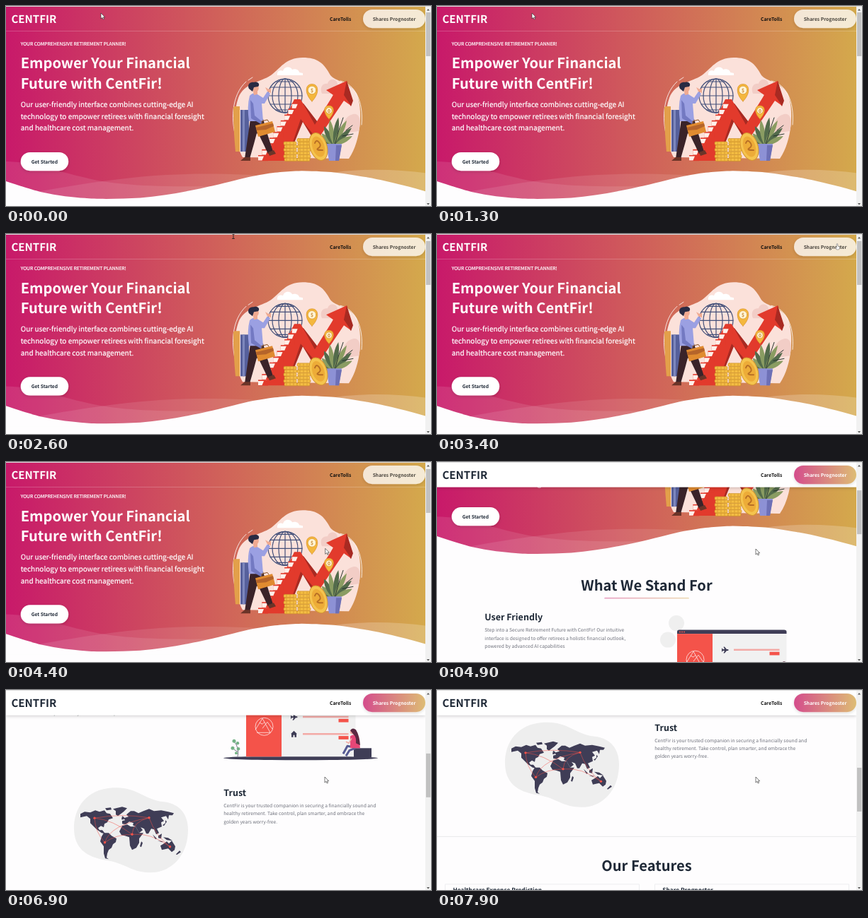
Animation, 600 px wide and 283 px high, one loop 8 s. Source, as an HTML page:

```html
<!DOCTYPE html>
<html lang="en">
<head>
<meta charset="utf-8">
<title>Retirement planner</title>
<style>
html, body { margin: 0; width: 100%; height: 100%; overflow: hidden; background: #fff; }
svg { display: block; width: 600px; height: 283px; }
text { font-family: "Noto Sans CJK SC", "Noto Sans CJK JP", "Noto Sans CJK KR", "Noto Sans", sans-serif; font-size: 6.71px; text-rendering: geometricPrecision; }
.b { font-weight: 700; }
.lead { font-size: 10.07px; }
.title { font-size: 20.13px; font-weight: 700; }
.brand { font-size: 15.04px; font-weight: 700; }
.sub { font-size: 12.53px; font-weight: 700; }
.card { font-size: 8.36px; font-weight: 700; }
.mid { text-anchor: middle; }
.ink { fill: #1f2937; }
.grey { fill: #6f727c; }
.navy { fill: #3f3d56; }
.line { fill: none; }
.firm { stroke: #fff; stroke-width: .2; }
</style>
</head>
<body>
<svg viewBox="0 0 600 283">
<defs>
  <linearGradient id="heroFill" gradientUnits="userSpaceOnUse" x1="0" x2="592">
    <stop stop-color="#c8196a"/><stop offset=".5" stop-color="#d0605a"/><stop offset="1" stop-color="#d4a94c"/>
  </linearGradient>
  <linearGradient id="pillFill"><stop stop-color="#c8196a"/><stop offset="1" stop-color="#d4a94c"/></linearGradient>
  <filter id="soft" x="-20%" y="-40%" width="140%" height="200%">
    <feDropShadow dx="0" dy="1.5" stdDeviation="2" flood-opacity=".18"/>
  </filter>
</defs>
<rect width="600" height="283" fill="#fefdfe"/>

<g id="page">
  <rect y="-2" width="592" height="275.4" fill="url(#heroFill)"/>
  <g fill="#fff">
    <text class="firm" x="20.7" y="55.7">YOUR COMPREHENSIVE RETIREMENT PLANNER!</text>
    <text class="title" x="20.7" y="88.4">Empower Your Financial</text>
    <text class="title" x="20.7" y="116.5">Future with CentFir!</text>
    <g class="firm">
      <text class="lead" x="20.7" y="142.6">Our user-friendly interface combines cutting-edge AI</text>
      <text class="lead" x="20.7" y="159.5">technology to empower retirees with financial foresight</text>
      <text class="lead" x="20.7" y="176.4">and healthcare cost management.</text>
    </g>
    <rect x="20.7" y="207" width="67.5" height="26.2" rx="13.1" filter="url(#soft)"/>
  </g>

  <!-- climbing the arrow -->
  <g stroke-linejoin="round" stroke-linecap="round">
    <path fill="#fbe1da" d="M334 214C323 194 319 156 328 130C336 109 359 108 374 98C387 89 394 73 419 73C440 73 449 81 458 98C465 107 485 107 495 124C504 145 502 190 484 216Z"/>
    <path fill="#f2cdc6" d="M446 124C442 114 448 109 454 110C456 101 468 103 468 111C476 112 475 122 472 124ZM478 180C474 168 478 156 490 153C499 151 502 162 498 177Z"/>
    <path class="line" stroke="#fff" stroke-width=".8" d="M327 194C316 164 318 126 339 107M342 105L348 101M472 106C492 110 505 134 502 168"/>
    <path fill="#fff" d="M383 95C384 90 389 91 391 92C393 85 402 85 404 90C409 88 414 91 414 94L419 95V98H383Z"/>
    <path fill="#e3a04a" d="M321 144Q321 142 323 142H330V206H324Q321 176 321 144Z"/>
    <path fill="#56609c" d="M331 147H343V206H331Z"/><path fill="#7d87bd" d="M334 147H337V206H334Z"/>
    <g class="line" stroke="#43507a" stroke-width="1.2">
      <circle cx="394" cy="127" r="24"/>
      <ellipse cx="394" cy="127" rx="9" ry="24"/><ellipse cx="394" cy="127" rx="18" ry="24"/>
      <path d="M394 103V151M370 127H418M373 115H415M373 139H415M381 107H407M381 147H407"/>
    </g>
    <path fill="#a82a22" d="M413 136L420 138L446 172L436 192L419 164L402 206ZM481 106L490 134L487 142L472 121ZM462 126L468 130L446 176L437 178Z"/>
    <path fill="#e23a2c" d="M365 219L407 132H416L436 168L462 126L452 119L481 106L487 141L477 134L440 189L416 160L396 219Z"/>
    <path fill="#a82a22" d="M481 106L488 134L487 141L477 126Z"/>
    <g id="stairs"></g>
    <g fill="#f4b73d" stroke="#d38b27" stroke-width=".6">
      <path d="M432 135C421 124 422 110.500 432 110.500S443 124 432 135ZM456 160C447 151 448 141 456 141S465 151 456 160Z"/>
      <circle cx="432" cy="119" r="5.8" fill="#fff4d4"/><circle cx="456" cy="148" r="4.4" fill="#fff4d4"/>
    </g>
    <text class="mid b" x="432" y="121.7" fill="#c5822b">$</text><text class="mid b" x="456" y="150.6" fill="#c5822b">0</text>
    <g id="coins" fill="#f4bd43" stroke="#c88a26" stroke-width=".6"></g>
    <g id="leaves"></g>
    <path class="line" stroke="#26332f" stroke-width="1" d="M464 197Q469 176 476 158M480 176L489 169M475 184L490 181"/>
    <path fill="#8d91d5" d="M452 195H474L470 219H456Z"/><path fill="#6d70b6" d="M466 197H474L470 219H465Z"/>
    <ellipse cx="441" cy="199" rx="12" ry="20" transform="rotate(-18 441 199)" fill="#f5c44e" stroke="#d49630"/>
    <ellipse cx="441" cy="199" rx="8.5" ry="15" transform="rotate(-18 441 199)" fill="#edac38"/>
    <path class="line" stroke="#b86f25" stroke-width="2" d="M436 194Q438 188 442 193T441 201T447 204"/>
    <path fill="#3a2329" d="M345 160H363L369 181L377 206L370 209L358 184L354 180L350 195L344 216H337L341 188Z"/>
    <path fill="#6b3428" d="M337 214H345V219H331ZM370 207L378 204L381 209L372 212Z"/>
    <path fill="#9ba0e2" d="M344 127Q349 121 355 125L363 130L369 121L373 124L365 138H361L363 163H343Q340 142 344 127Z"/>
    <path fill="#7379c2" d="M345 133L349 138L351 155L362 164L360 167L346 159Z"/>
    <path fill="#f0aa91" d="M348 117H355V125L350 126ZM369 121L366 115L371 118L374 116L374 123Z"/>
    <ellipse cx="353" cy="116" rx="3.8" ry="5.2" fill="#f0aa91"/>
    <path fill="#292b43" d="M343 117C340 111 345 107 350 108C356 106 359 111 356 114L350 115L348 121Z"/>
    <path class="line" stroke="#865022" d="M361 167V163L369 161L371 164"/>
    <path fill="#e08b30" d="M352 169L376 163L380 178L356 185Z"/><path fill="#b5642a" d="M353 172L377 166L378 170L367 175L354 176Z"/>
  </g>
  <text class="mid b ink" x="54.4" y="222.6">Get Started</text>

  <g fill="#fff" transform="translate(0 201.8) scale(.4146)">
    <g transform="translate(-2 44)">
      <path opacity=".1" d="M0 0C91 1 148 27 292 60C388 82 544 89 759 83C469 156 216 154 0 75"/>
      <path opacity=".1" d="M100 105C277 72 426 53 546 46C666 39 811 42 979 55C931 56 810 75 617 111C423 148 251 145 100 105"/>
      <path opacity=".2" d="M1046 52C1131 29 1279 18 1439 40V120C1271 78 1140 55 1046 52"/>
    </g>
    <path fill="#fefdfe" transform="translate(-4 76)" d="M0 34C57 53 98 66 124 72C181 85 234 90 272 93C311 97 397 96 461 92C560 84 660 62 728 46C780 34 819 22 856 16C922 4 956 2 1011 0C1061 1 1097 3 1121 5C1162 9 1209 18 1235 22C1286 31 1354 47 1441 72V106H0Z"/>
  </g>

  <text class="title mid ink" x="296" y="324.5">What We Stand For</text>
  <rect x="236.3" y="334.6" width="119.5" height="1.9" rx=".9" fill="url(#pillFill)" opacity=".4"/>
  <text class="sub ink" x="67.3" y="367">User Friendly</text>
  <g class="grey">
    <text x="67.3" y="383.3">Step into a Secure Retirement Future with CentFir! Our intuitive</text>
    <text x="67.3" y="394.5">interface is designed to offer retirees a holistic financial outlook,</text>
    <text x="67.3" y="405.7">powered by advanced AI capabilities</text>
  </g>

  <!-- browser window -->
  <g transform="translate(0 245)">
    <g fill="#efefef"><circle cx="338" cy="126" r="11"/><circle cx="326" cy="149.5" r="11"/></g>
    <ellipse class="navy" cx="416" cy="222" rx="109" ry="3"/>
    <rect x="339" y="138" width="154.5" height="82" fill="#f1f1f1"/>
    <path class="navy" d="M339 141V138Q339 135.500 342 135.500H490Q493.500 135.500 493.500 138V141Z"/>
    <g fill="#f4534a">
      <rect x="339" y="141" width="50" height="79"/>
      <circle cx="343" cy="138.5" r="1"/><circle cx="346" cy="138.5" r="1"/><circle cx="349" cy="138.5" r="1"/>
      <rect x="469.5" y="166.5" width="14" height="4.8"/><rect x="469.5" y="190.8" width="14" height="4.8"/>
      <path opacity=".45" d="M419 162.500H483.500V165H419ZM419 186.800H483.500V189.300H419Z"/>
    </g>
    <path class="line" stroke="#fff" stroke-width=".7" d="M352 182L362 166L373 186M362 180L369 171L376 181M358 172L362 174L365 171M354 186H373"/>
    <circle class="line" cx="364.5" cy="177.5" r="12.5" stroke="#fff" stroke-width=".7"/>
    <path class="navy" d="M402 161L403.500 163H406L404.500 159.500H406L409 163H411Q412 164 411 165H409L406 168.500H404.500L406 165H403.500L402 167ZM402 188L406.500 183.500L411 188H410V192.500H407.500V189.500H405.500V192.500H403V188Z"/>
    <path class="line" stroke="#3f3d56" stroke-width=".7" d="M327 220Q330 209 322 198M327 213L322 210"/>
    <g fill="#74b286"><circle cx="322" cy="198" r="2.5"/><circle cx="327" cy="201" r="2.2"/><circle cx="320" cy="208" r="2.5"/><circle cx="328" cy="209" r="2.3"/><circle cx="325" cy="215" r="2"/></g>
    <path class="navy" d="M491 208H516V221H491Z"/>
    <path class="line" stroke="#565a92" stroke-width="3" stroke-linejoin="round" d="M492 207L482 205L476 216M493 208L485 211L480 219"/>
    <path fill="#e64777" d="M486 191Q493 186 498 193L500 208H486Z"/>
    <path class="line" stroke="#f0aaa2" stroke-width="1.5" d="M488 194L484 201L480 199"/>
    <circle cx="489" cy="185" r="3.2" fill="#f0aaa2"/>
    <path fill="#5b2942" d="M486 183Q489 178 494 182Q499 190 500 204L494 201Q495 192 490 188Z"/>
  </g>

  <!-- world map -->
  <g transform="translate(0 463)">
    <path fill="#eee" d="M96 103C96 75 113 48 151 46C184 44 195 63 223 66C246 69 257 84 257 106C257 139 236 166 204 166C177 166 169 153 143 149C112 144 96 131 96 103Z"/>
    <g class="navy">
      <path d="M105 83L111 80L119 81L126 78L132 80L139 78L142 82L147 83L151 89L145 91L143 95L139 97L138 102L134 100L130 103L132 106L136 106L140 111L135 110L128 105L123 100L119 96L119 90L114 86L105 88ZM140 75L148 74L149 77L142 78ZM151 76L164 73L171 75L166 80L158 86L155 84L155 79Z"/>
      <path d="M138 110L145 110L149 114L156 118L155 123L151 126L149 131L145 134L143 139L142 145L145 147L140 146L138 139L138 129L133 122L135 115Z"/>
      <path d="M164 97L164 93L168 92L166 89L173 87L170 84L176 79L181 79L187 82L194 79L202 76L209 79L219 78L229 80L237 82L235 85L230 85L229 91L226 86L219 88L223 93L219 95L220 101L213 104L216 110L212 112L209 105L205 104L201 111L198 111L195 104L190 102L193 106L188 110L183 101L179 99L180 96L174 94L169 98ZM164 86L167 88L166 91L163 91ZM225 92L227 94L223 100L221 99L225 96Z"/>
      <path d="M164 100L171 98L176 101L183 101L188 110L194 110L188 118L188 124L184 131L178 134L175 128L174 116L168 114L163 113L160 108ZM191 122L193 124L191 130L189 129Z"/>
      <path d="M207 112L213 118L211 119ZM215 114L220 111L219 118L215 117ZM222 116L229 117L235 121L227 120ZM214 121L222 122L220 123ZM218 128L223 125L227 122L230 125L234 121L239 129L238 134L234 137L229 132L220 134ZM245 135L247 137L241 141L240 140Z"/>
    </g>
    <path class="line" stroke="#f4534a" stroke-width=".5" d="M125 89Q150 91 178 112Q155 112 139.500 123.500Q147 98 202 88.500Q179 94 178 112Q204 109 231.500 129.500M125 89Q126 109 139.500 123.500M125 89Q163 82 202 88.500Q211 114 231.500 129.500"/>
    <g fill="#f4534a"><circle cx="125" cy="89" r="1.7"/><circle cx="202" cy="88.5" r="1.7"/><circle cx="139.5" cy="123.5" r="1.7"/><circle cx="178" cy="112" r="1.7"/><circle cx="231.5" cy="129.5" r="1.7"/></g>
  </g>
  <text class="sub ink" x="307.3" y="520.7">Trust</text>
  <g class="grey">
    <text x="307.3" y="537">CentFir is your trusted companion in securing a financially sound and</text>
    <text x="307.3" y="548.2">healthy retirement. Take control, plan smarter, and embrace the</text>
    <text x="307.3" y="559.4">golden years worry-free.</text>
  </g>
  <path class="line" stroke="#e8e8ea" d="M0 670.500H592"/>
  <text class="title mid ink" x="296" y="718.7">Our Features</text>
  <path class="line" stroke="#ededf0" d="M11.500 760V738H285.500V760M307.500 760V738H581.500V760"/>
  <text class="card ink" x="22.5" y="749.3">Healthcare Expense Prediction</text>
  <text class="card ink" x="318.3" y="749.3">Share Prognoster</text>
</g>

<rect id="navBack" width="592" height="35.6" fill="#fff" filter="url(#soft)"/>
<path id="navLine" d="M0 35.500H592" stroke="#fff" stroke-opacity=".2"/>
<text id="brand" class="brand" x="7.5" y="24.3">CENTFIR</text>
<text class="b" x="457" y="20.6" fill="#111">CareTolls</text>
<g opacity=".77">
  <rect id="pill" x="504" y="5" width="88" height="26.2" rx="13.1" filter="url(#soft)"/>
  <text id="pillText" class="mid b" x="548" y="20.6">Shares Prognoster</text>
</g>

<rect x="592" width="8" height="283" fill="#f1f1f1"/>
<rect id="thumb" x="593" width="6.3" height="62" fill="#c1c1c1"/>
<path fill="#555" d="M594 6.500L596 4L598 6.500ZM594 279L596 281.500L598 279Z"/>
<rect width="600" height="1" fill="#dedede"/>

<g id="cursor">
  <path id="arrow" fill="#fff" stroke="#222" stroke-width=".6" d="M0 0V8L1.900 6.300L3.200 9L4.500 8.400L3.300 5.800H5.700Z"/>
  <path id="beam" class="line" stroke="#222" stroke-width=".9" d="M-1.800 0H1.800M0 0V6.500M-1.800 6.500H1.800"/>
  <path id="hand" fill="#fff" stroke="#555" stroke-width=".5" d="M-.8 0Q0 -1 .8 0V3L3.500 4V6L2.500 8H-1L-2.600 5L-2 4.400L-.8 5.500Z"/>
</g>
</svg>
<script>
const LOOP = 8000;
const NOTCH = 46.67;
const NUDGE = 4.67;
const notchTimes = [4500, 4600, 4700, 5050, 5200, 5980, 6320, 6750, 7200, 7756];
const cursorStops = [[1900, 134, 10], [2600, 321, 0], [3400, 565, 14], [4450, 450, 123]];

const el = id => document.getElementById(id);
const add = (id, markup) => el(id).insertAdjacentHTML('beforeend', markup);
const clamp = v => Math.min(1, Math.max(0, v));
const easeOut = p => 1 - (1 - p) ** 2;
const smooth = p => p * p * (3 - 2 * p);
const show = (id, on) => el(id).setAttribute('visibility', on ? 'visible' : 'hidden');

function addCoins(x, top, count) {
  for (let i = count - 1; i >= 0; i--) {
    const y = top + i * 4.6;
    add('coins', `<rect x="${x + i % 2}" y="${y}" width="18" height="4.4" rx="1.5"/>
      <path d="M${x + 4} ${y + 1}v2.4m5 -2.4v2.4m5 -2.4v2.4"/>`);
  }
}

// Each step is a red tread over a pale riser.
function addStairs(count) {
  for (let i = 0; i < count; i++) {
    const x = 356 + i * 5.3, y = 211 - i * 8.2;
    add('stairs', `<path fill="#e23a2c" d="M${x} ${y}h14v8.200h-14z"/>
      <path fill="#fff0ea" d="M${x} ${y + 1.6}h8l-2.500 6h-5.500z"/>`);
  }
}

function addLeaves(count) {
  for (let i = 0; i < count; i++) {
    const angle = -62 + i * 124 / (count - 1);
    const length = 30 + 11 * Math.cos((angle - 15) * Math.PI / 90);
    const fill = i % 2 ? '#8a9c62' : '#536b4b';
    add('leaves', `<path fill="${fill}" transform="translate(463 198) rotate(${angle})"
      d="M0 0C-6 ${-length * .4} -4 ${-length * .8} 0 ${-length}C4 ${-length * .7} 4 ${-length * .4} 0 0Z"/>`);
  }
}

addCoins(392, 192, 6);
addCoins(411, 187.5, 7);
addStairs(10);
addLeaves(8);

function scrollAt(t) {
  const nudge = NUDGE * easeOut(clamp((t - 2200) / 150));
  return notchTimes.reduce((sum, at) => sum + NOTCH * easeOut(clamp((t - at) / 250)), nudge);
}

function cursorAt(t) {
  let [, x, y] = cursorStops[0];
  for (let i = 1; i < cursorStops.length; i++) {
    const [from, x0, y0] = cursorStops[i - 1], [to, x1, y1] = cursorStops[i];
    if (t < from) break;
    const p = smooth(clamp((t - from) / (to - from)));
    x = x0 + (x1 - x0) * p;
    y = y0 + (y1 - y0) * p;
  }
  return [x, y];
}

function render(t) {
  const scroll = scrollAt(t);
  const solid = scroll > NUDGE + .1;
  el('page').setAttribute('transform', `translate(0 ${-scroll})`);
  el('thumb').setAttribute('y', 9 + scroll * .218);
  show('navBack', solid);
  show('navLine', !solid);
  el('brand').setAttribute('fill', solid ? '#1f2937' : '#fff');
  el('pill').setAttribute('fill', solid ? 'url(#pillFill)' : '#fff');
  el('pillText').setAttribute('fill', solid ? '#fff' : '#1f2937');

  const [x, y] = cursorAt(t);
  const kind = x > 504 && y < 31 ? 'hand' : t > 2500 && t < 2750 ? 'beam' : 'arrow';
  ['arrow', 'beam', 'hand'].forEach(id => show(id, id === kind));
  el('cursor').setAttribute('transform', `translate(${x} ${y})`);
}

function tick(now) {
  render(now % LOOP);
  requestAnimationFrame(tick);
}
render(0);
requestAnimationFrame(tick);
</script>
</body>
</html>
```
